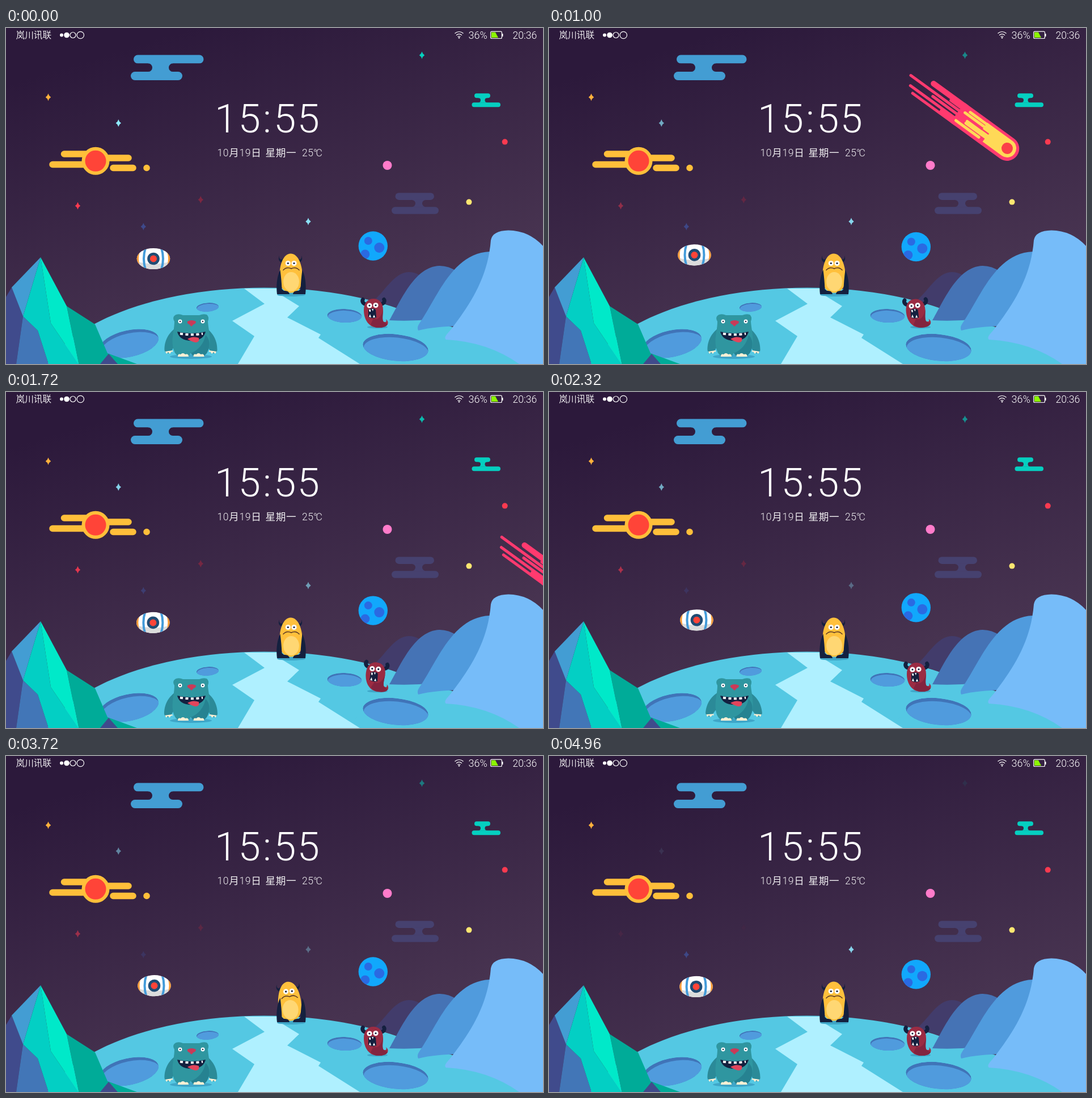
These frames come from a looping animation (947x592 px, 5 s). An HTML page:

```html
<!DOCTYPE html>
<html lang="zh-CN">
<head>
<meta charset="utf-8">
<title>Night planet</title>
<style>
  html, body { margin: 0; width: 100%; height: 100%; overflow: hidden; background: #2c193b; }
  svg { display: block; width: 947px; height: 592px; }
  text { fill: #fff; font-family: Roboto, "Noto Sans CJK SC", "Noto Sans CJK", sans-serif; font-weight: 300; }
  .line { stroke-linecap: round; stroke-linejoin: round; fill: none; }
  .navy { fill: #14203f; }
  .shade { fill: #3fa6c8; }
</style>
</head>
<body>
<svg viewBox="0 0 947 592">
  <defs>
    <linearGradient id="night" gradientUnits="userSpaceOnUse" x1="330" y1="0" x2="480" y2="500">
      <stop stop-color="#2c193b"/><stop offset="1" stop-color="#473350"/>
    </linearGradient>
    <clipPath id="disc"><circle r="25.7"/></clipPath>
    <clipPath id="hull"><ellipse rx="29.3" ry="18.6"/></clipPath>
    <clipPath id="pit"><circle r="1"/></clipPath>
    <g id="crater" clip-path="url(#pit)">
      <circle r="1" fill="#4074b8"/><circle cx=".03" cy=".24" r="1" fill="#509bdd"/>
    </g>
    <g id="eye"><circle r="4.6" fill="#fff"/><circle r="1.6" class="navy"/></g>
  </defs>
  <rect width="947" height="592" fill="url(#night)"/>

  <g id="sky"></g>

  <path class="line" stroke="#ffbf3a" stroke-width="11.5" d="M102.5 222H150M82 240.5H150M165 229H216M189 246.5H224M248 246.5h.1"/>
  <circle cx="158" cy="234.3" r="21.5" fill="#ff4438" stroke="#ffbf3a" stroke-width="6"/>
  <circle cx="879.7" cy="200.6" r="5" fill="#fb3a50"/>
  <circle cx="672.5" cy="242" r="8" fill="#ff7bca"/>
  <circle cx="816.5" cy="306.6" r="5" fill="#ffe771"/>

  <g id="moon">
    <circle r="25.7" fill="#11a8fc"/>
    <g fill="#2a6ae2" clip-path="url(#disc)">
      <circle cx="-8.5" cy="-9" r="7"/><circle cx="11" cy="3" r="9"/><circle cx="-14" cy="14.5" r="8"/>
    </g>
  </g>

  <g id="ship"><g clip-path="url(#hull)">
    <rect x="-30" y="-19" width="60" height="38" fill="#fff"/>
    <path d="M-30 5Q0 13 30 5V20H-30Z" fill="#dcdcdc"/>
    <path d="M-30-12H-24Q-28 0-24 12H-30ZM30-12H24Q28 0 24 12H30Z" fill="#f79a34"/>
    <path d="M-14-19Q-20 0-14 19M14-19Q20 0 14 19" fill="none" stroke="#439bd9" stroke-width="4"/>
    <circle r="10.8" fill="#204c74"/><circle r="6" fill="#ff4438"/>
  </g></g>

  <g id="comet"><g transform="rotate(36)" class="line" stroke-width="5">
    <path d="M-108-21H0A21.5 21.5 0 0 1 0 22H-108Z" fill="#ff3a6f"/>
    <path stroke="#ff3a6f" stroke-width="10" d="M-172-16H-100"/>
    <path stroke="#ff3a6f" d="M-130-10H-100M-213-4H-100M-160 3H-100M-203 11H-100M-133 15H-100M-192 19.500H-100"/>
    <path d="M-55-16H0A16 16 0 0 1 0 16H-42V9.500H-55Z" fill="#ffd957"/>
    <path stroke="#ffd957" d="M-90-13H-50M-97-7H-50M-85 3H-50M-85 7H-50M-102 13.500H-52"/>
    <path stroke="#ff3a6f" stroke-width="2.500" d="M-70-1H-42"/>
    <circle r="10" fill="#fb4048"/>
  </g></g>

  <!-- ground and mountains -->
  <ellipse cx="455" cy="647.500" rx="400" ry="190" fill="#54c8e3"/>
  <path d="M690 500L740 512L860 550L947 592H600Z" fill="#54c8e3"/>
  <path d="M650 479C670 461 685 431 710 430C724 430 734 437 740 445L692 494Z" fill="#423c6b"/>
  <path d="M420 459H484L486 471L517 490L496 510L555 540L551 546L624 592H409L438 543L399 516L456 486Z" fill="#aff0ff"/>
  <use href="#crater" transform="translate(355.500 492) rotate(-4) scale(19.700 7.800)"/>
  <use href="#crater" transform="translate(597 507) rotate(2) scale(30.500 12)"/>
  <use href="#crater" transform="translate(687 563) rotate(6) scale(58 23.500)"/>
  <use href="#crater" transform="translate(217 556) rotate(-12) scale(53 23.500)"/>
  <path d="M676 515C696 482 720 420 765 419Q781 419 795 429L755 513Q715 517 676 515Z" fill="#4573b5"/>
  <path d="M727 533C724 527 728 522 732 516C762 470 790 396 853 394L858 440L795 525Q750 527 727 533Z" fill="#509bdd"/>
  <path d="M776 549C771 545 779 538 784 532C818 488 850 440 855 374Q858 357 886 356.500Q922 357 947 384V592H905Q850 553 776 549Z" fill="#76bcf9"/>

  <!-- crystals -->
  <path d="M0 474L10 457L30 508L18 592H0Z" fill="#404b8c"/>
  <path d="M10 457L61 404L30 508Z" fill="#439dd3"/>
  <path d="M30 508L56 533L75 592H18Z" fill="#4276b7"/>
  <path d="M107 490L157 522L179 573L231 592H128Z" fill="#00ab98"/>
  <path d="M61 404L79 520L128 592H75L56 533L30 508Z" fill="#03cfc4"/>
  <path d="M61 404L107 490L128 592L79 520Z" fill="#00e9c9"/>
  <path d="M181 574L166 592H197Z" fill="#404b8c"/>

  <!-- yellow monster -->
  <ellipse cx="503" cy="470" rx="25" ry="3" class="shade"/>
  <g id="yellow">
    <path id="horn" class="navy" d="M482 401Q481 408 486 408L491 404L488 414Q478 411 482 401Z"/>
    <use href="#horn" transform="matrix(-1 0 0 1 1003 0)"/>
    <path d="M502 397.500C515 397.500 523 417 523 440C523 457 514 466.500 502.500 466.500S482 457 482 440C482 417 489 397.500 502 397.500Z" fill="#ffc03c"/>
    <ellipse cx="503" cy="447" rx="14" ry="17" fill="#ffd773"/>
    <use href="#eye" x="497.300" y="414.500"/><use href="#eye" x="508" y="414.500"/>
    <path class="line" d="M489 426.500Q495 420 503 424Q511 420 517 426.500" stroke="#563525" stroke-width="1.500"/>
  </g>
  <path id="limb" class="navy" d="M483.500 426C477 440 476.500 456 478 469H500Q499 462 490 463L486.500 460Q486 445 483.500 426Z"/>
  <use href="#limb" transform="matrix(-1 0 0 1 1006 0)"/>

  <!-- red monster -->
  <ellipse cx="655" cy="527" rx="18" ry="2.500" class="shade"/>
  <g id="red">
    <path id="tusk" class="navy" d="M629 474.500C622 478 625 490 636 490L641 482Q634 486 632 481Q635 476 629 474.500Z"/>
    <use href="#tusk" transform="matrix(-1 0 0 1 1296 0)"/>
    <path d="M648 477C658 477 665 484 665 497C665 508 661 518 669 518Q672 518 670 513Q675 517 673 522Q670 528 656 528C640 528 631 514 631 497C631 484 638 477 648 477Z" fill="#9b2c43"/>
    <path d="M648 512Q659 517 665 497Q663 515 666 518L673 522Q670 528 656 528Q649 528 643 522Z" fill="#82243f"/>
    <use href="#eye" x="641" y="489"/><use href="#eye" x="652" y="488.500"/>
    <path class="navy" d="M639 496Q646 492 652 496L653 510Q645 513 639 509Z"/>
    <path d="M640 496H643V500H641ZM645 495H648L647 499ZM640 509L642 504L644 510ZM647 510L649 505L651 510Z" fill="#fff"/>
  </g>

  <!-- green monster -->
  <ellipse cx="326" cy="579" rx="37" ry="4" class="shade"/>
  <g id="arm">
    <path d="M303 526C286 536 279 552 279.500 568Q282 575 290 572L296 562L306 550Z" fill="#2b8a98"/>
    <path d="M281 570L283 574L286 571L289 574L292 570L294 571V568Z" fill="#fff0d4"/>
  </g>
  <use href="#arm" transform="matrix(-1 0 0 1 652 0)"/>
  <path d="M300 505Q306 503 312 506H341Q348 503 354 505Q359 509 356 517C357 532 361 543 359 560Q356 574 348 578H330L326 573L322 578H304Q296 574 294 560C292 543 297 532 297 517Q292 509 300 505Z" fill="#2f96a0"/>
  <path d="M352 541C361 549 360 563 354 573L349 578H331L326 573Q347 564 352 541Z" fill="#268291"/>
  <path d="M320 517Q327 513 335 517Q335 521 331 522L327 526L323 522Q319 521 320 517Z" fill="#c93a58"/>
  <use href="#eye" transform="translate(307 517) scale(.75)"/><use href="#eye" transform="translate(347 517) scale(.75)"/>
  <path class="navy" d="M302 535Q327 541 352 535Q348 551 327 551Q306 551 302 535Z"/>
  <path d="M320 548Q329 542 340 546Q342 554 334 554Q328 553 320 548Z" fill="#e2455c"/>
  <path class="line" d="M307 538.500Q327 542 347 538.500" stroke="#fff" stroke-width="4" style="stroke-dasharray:5 4.500;stroke-linecap:butt"/>
  <path id="foot" d="M303 579Q303 573 308 575Q312 571 316 575Q322 573 322 579Z" fill="#fff0d4"/>
  <use href="#foot" x="27.500"/>

  <!-- status bar and clock -->
  <text x="17.500" y="18" font-size="15.700" opacity=".9">岚川讯联</text>
  <g fill="#fff">
    <circle cx="98" cy="12.500" r="3"/><circle cx="107" cy="12.500" r="4.800"/><circle cx="799" cy="17.300" r="1.200"/>
    <path d="M874.500 10H876.500V15H874.500Z"/>
  </g>
  <g fill="none" stroke="#fff" stroke-width="1.200">
    <circle cx="118" cy="12.500" r="5"/><circle cx="131.300" cy="12.500" r="6.200"/>
    <path d="M791.500 9.500Q799 3.500 806.500 9.500M794 12.700Q799 8.500 804 12.700M796.500 15.500Q799 13.500 801.500 15.500"/>
    <rect x="854.600" y="6.100" width="19.800" height="12.400" rx="2"/>
  </g>
  <path d="M856 7.500H863L868 17H856Z" fill="#8cf800"/>
  <text x="815.500" y="18.500" font-size="18">36%</text>
  <text x="893.500" y="18.500" font-size="17.600">20:36</text>
  <g font-size="71" letter-spacing="2">
    <text x="368" y="183.500">15</text><text x="453" y="183.500">:</text><text x="472" y="183.500">55</text>
  </g>
  <g font-size="17.600" letter-spacing=".6" opacity=".92">
    <text x="372.500" y="225.500">10月19日</text><text x="457.500" y="225.500">星期一</text><text x="522" y="225.500">25℃</text>
  </g>
</svg>
<script>
const $ = id => document.getElementById(id);
const TAU = 2 * Math.PI, LOOP = 5, STEP = .04;

// Two rounded bars joined by a neck with concave sides
const cloud = (fill, y, h, [a, b], [c, d], [n, m]) => {
  const r = h / 2, bar = (x, end, top) => `<rect x="${x}" y="${top}" width="${end - x}" height="${h}" rx="${r}"/>`;
  return `<g fill="${fill}">${bar(a, b, y)}${bar(c, d, y + 2 * h)}
    <path d="M${n - r} ${y + h - .3}v.3a${r} ${r} 0 0 1 0 ${h}v.3H${m + r}v-.3a${r} ${r} 0 0 1 0 ${-h}v-.3Z"/></g>`;
};

// Star brightness over t seconds
const steady = () => 1;
const fade = (flicker, top = 1) => t =>
  top * (1 - .9 * (t / LOOP) ** 2) * (1 - flicker * (1 - Math.cos(TAU * t / 1.85)) / 2);
const breathe = top => t => top * (.6 + .4 * Math.cos(TAU * (t - .4) / 5.2));

const stars = [
  [74.5, 122, '#ffb13c', steady],
  [733.5, 48, '#06d0bd', fade(.4)],
  [198.3, 167.5, '#8feaff', fade(.3)],
  [126.5, 313.3, '#ff3a50', fade(.55)],
  [343.3, 302.5, '#93273f', fade(.4, .75)],
  [242.3, 350, '#3f549f', breathe(.8)],
  [533, 341, '#8feaff', breathe(1)],
];

$('sky').innerHTML =
  cloud('#439dd3', 47.5, 14.8, [225, 348.5], [220, 311], [258, 287]) +
  cloud('#05cfc0', 115.3, 8, [826, 854], [821.5, 872], [837, 844.5]) +
  cloud('#46416f', 290.5, 12.4, [686.5, 755], [680, 763], [722, 734]) +
  stars.map(([x, y, color]) => `<path class="star" fill="${color}" transform="translate(${x} ${y})"
    d="M0-6.5Q1.2-2 4.7 0Q1.2 2 0 6.5Q-1.2 2-4.7 0Q-1.2-2 0-6.5Z"/>`).join('');
const starNodes = document.querySelectorAll('.star');

// Progress 0..1 through a gesture
const progress = (t, start, end) => Math.min(1, Math.max(0, (t - start) / (end - start)));
// A small lean one way, then a larger one back
const sway = (k, size) => size * k * Math.sin(TAU * k);

const move = (id, x, y) => $(id).setAttribute('transform', `translate(${x} ${y})`);
const turn = (id, angle, x, y) => $(id).setAttribute('transform', `rotate(${angle} ${x} ${y})`);

function draw() {
  const t = Math.floor(performance.now() / 1000 % LOOP / STEP) * STEP;
  // Three floating cycles per loop, the first a little slower
  const phase = TAU * (.6 * t - .08 * Math.sin(Math.PI * t / LOOP));

  starNodes.forEach((node, i) => node.setAttribute('opacity', stars[i][3](t)));
  move('ship', 258.6 + 2.9 * Math.sin(phase + .5), 403.1 + 3.4 * Math.cos(phase));
  move('moon', 647.3, 384 - 4.5 * Math.sin(phase));
  move('comet', 480 + 328 * t, -27 + 239 * t);

  turn('red', sway(progress(t, .6, 2.24), -12), 655, 525);
  turn('arm', 5.5 * Math.sin(Math.PI * progress(t, 1.56, 2.9)) ** 2, 300, 530);
  turn('yellow', sway(progress(t, 2.64, 4.3), 8), 503, 465);
  requestAnimationFrame(draw);
}
draw();
</script>
</body>
</html>
```
